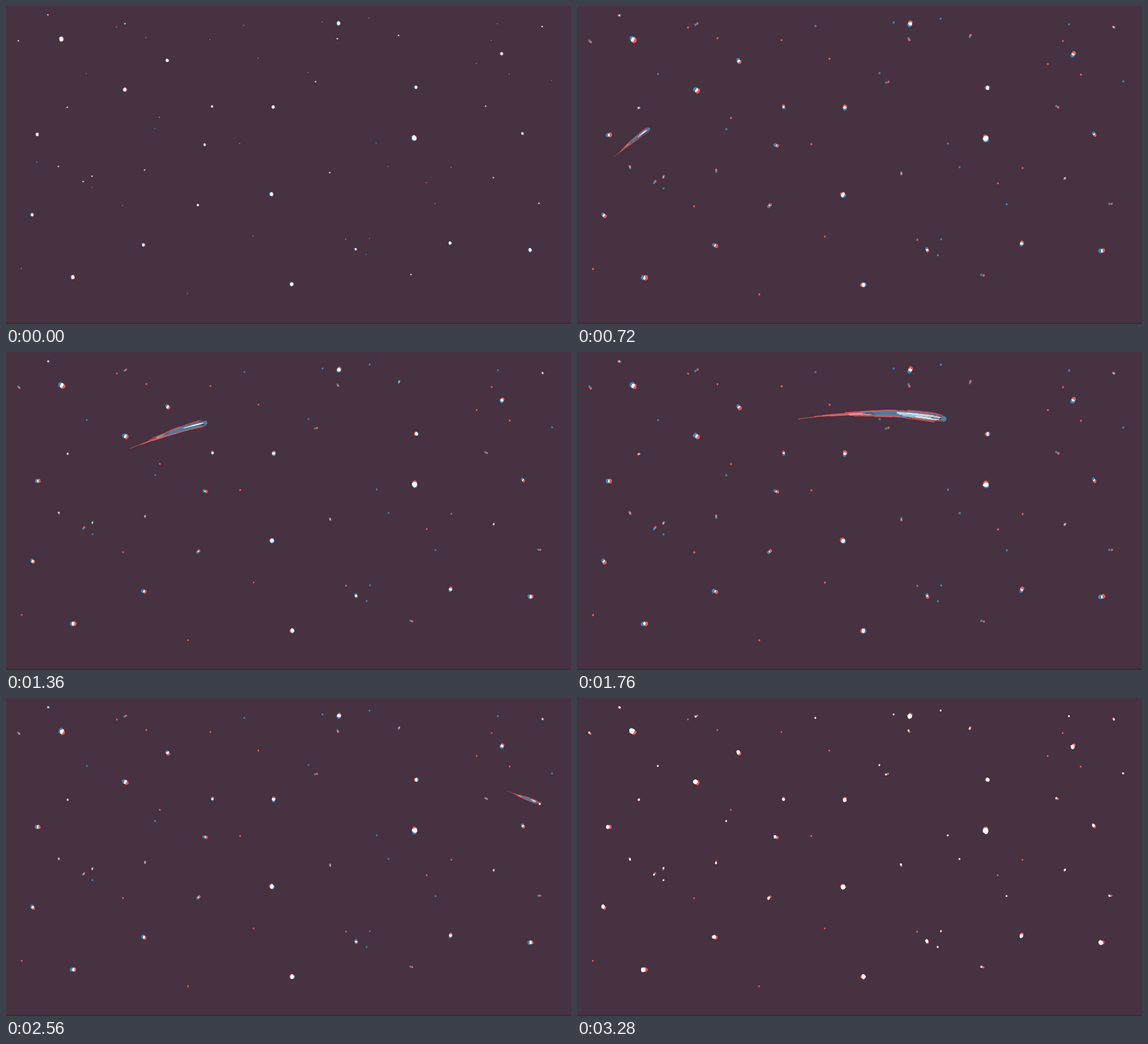
An HTML page with a canvas for the animation above (3.36 s loop, 960 by 540 pixels).

```html
<!DOCTYPE html>
<html lang="en">
<head>
<meta charset="utf-8">
<title>Comet</title>
<style>
html, body { margin: 0; width: 100%; height: 100%; overflow: hidden; background: #463240; }
canvas { display: block; }
</style>
</head>
<body>
<canvas id="sky" width="960" height="540"></canvas>
<script>
const ctx = document.getElementById('sky').getContext('2d');
const STEP = 80, LOOP = 3360, TAU = Math.PI * 2;
const BG = '#463240', RED = '#e65c5f', BLUE = '#4682a9', WHITE = '#fff';

// x, y, radius, direction in degrees in which the red layer slips off the blue
const BIG = [
  [94,56,4,50], [202,142,3.4,40], [274,92.5,2.8,70], [454,171.5,2.9,-100],
  [565,29.5,3.4,-90], [842,81,2.9,-70], [696.5,138,2.8,180], [53,218,2.8,0],
  [693.5,224,4.4,-125], [451,319.5,3.4,-150], [44.5,354.5,2.7,60], [233.5,405.5,2.7,30],
  [113.5,460.5,3.4,0], [485.5,472.5,3.4,180], [754.5,402.5,2.8,-90], [890.5,414.5,3.1,-10],
  [594,413,2.2,90], [877.5,216.5,2.2,70], [350,170.5,2,-120], [337.5,235.5,2.2,25],
  [326,338,2,-60]
];
// Positions of the faint stars seen in both layers, or in only one of them
const SMALL = [
  [550,283], [526,128.5], [911,35], [563,55.5], [202,30], [71,15], [21,59], [131,298],
  [104,172], [815,170], [667,50], [828,291.5], [688,456], [235.5,278.5], [146,289],
  [905.5,335], [89,272.5]
];
const REDS = [
  [187.5,35.5], [237.5,53.5], [346.5,57], [428,88.5], [824.5,58.5], [799,97.5],
  [855,115.5], [260.5,189], [397,233.5], [198,339], [26,445.5], [308.5,488.5],
  [577,396], [756,274], [714,300], [420,390.5]
];
const BLUES = [
  [404,33], [537,27], [617,20.5], [835,30], [136.5,114.5], [513,113], [927,127],
  [252.5,208], [629,232.5], [649,272.5], [729,335.5], [617.5,395], [612,422], [146,308.5]
];

function random(seed) {
  seed = seed * 7919 + 101;
  const next = () => (seed = (seed * 16807 + 11) % 2147483647) / 2147483647;
  next();
  return next;
}

// Smooth curve through [input, output] points, held at both ends
function curve(points) {
  const n = points.length - 1;
  const slope = i => {
    const a = points[Math.max(0, i - 1)], b = points[Math.min(n, i + 1)];
    return (b[1] - a[1]) / (b[0] - a[0]);
  };
  return v => {
    v = Math.min(points[n][0], Math.max(points[0][0], v));
    let i = 0;
    while (i < n - 1 && v > points[i + 1][0]) i++;
    const [a, p] = points[i], [b, q] = points[i + 1], h = b - a, u = (v - a) / h;
    return p + (q - p) * u * u * (3 - 2 * u) +
      h * u * (1 - u) * (slope(i) * (1 - u) - slope(i + 1) * u);
  };
}

const headX = curve([[0,52], [400,65], [720,124], [1360,342], [1760,627],
  [2240,860], [2560,905], [2720,908]]);
const pathY = curve([[52,265], [122,209], [200,168], [341,120], [520,104],
  [627,114], [790,138], [908,179]]);
const halfWidth = curve([[0,2], [1360,6], [2100,8], [2700,1.5]]);

function blob(x, y, r, seed) {
  const rnd = random(seed), path = new Path2D();
  for (let i = 0; i < 8; i++) {
    const a = (i + rnd() * .6) / 8 * TAU, k = r * (.88 + rnd() * .3);
    path.lineTo(x + Math.cos(a) * k, y + Math.sin(a) * k * 1.1);
  }
  path.closePath();
  return path;
}

function fill(path, color) {
  ctx.fillStyle = color;
  ctx.fill(path);
}

// Two slipping layers, white where they overlap
function pair(x, y, r, angle, swing, seed, cool) {
  const gap = 1.7 * swing, dx = Math.cos(angle) * gap, dy = Math.sin(angle) * gap;
  x += 1.1 * swing;
  y += 1.1 * swing;
  r += .7 * swing;
  const red = blob(x + dx + .5, y + dy, r, seed);
  const blue = blob(x - dx - .5, y - dy, r, seed + 7);
  fill(red, RED);
  fill(blue, cool);
  ctx.save();
  ctx.clip(red);
  fill(blue, WHITE);
  ctx.restore();
}

function drawStars(pose, cool) {
  // Four poses out, two poses back
  const swing = Math.sin(Math.PI / 2 * Math.min(pose / 4, (6 - pose) / 2));
  const single = (color, grow) => ([x, y], i) =>
    fill(blob(x + 1.2 * swing, y + 1.2 * swing, 1 + grow * swing, i * 6 + pose), color);

  REDS.forEach(single(RED, .7));
  BLUES.forEach(single(cool, .8));
  SMALL.forEach(([x, y], i) =>
    pair(x, y, 1.3, random(i)() * TAU, swing, i * 6 + pose, cool));
  BIG.forEach(([x, y, r, degrees], i) =>
    pair(x, y, r, degrees / 360 * TAU, swing, i * 6 + pose, cool));
}

function drawComet(t, frame) {
  const head = headX(t), tail = headX(t - 345), half = halfWidth(t);
  const rnd = random(frame);
  const between = (a, b) => a + (b - a) * rnd();
  const strand = (from, to, offset, width, color) => {
    ctx.beginPath();
    for (let k = 0; k <= 12; k++) {
      const u = Math.min(1, from + (to - from) * k / 12);
      const x = tail + (head - tail) * u;
      const angle = Math.atan2(pathY(x + 1) - pathY(x - 1), 2);
      const spread = half * offset * (.1 + .9 * u ** .8) * Math.min(1, .5 + (1 - u) * 6);
      ctx.lineTo(x - Math.sin(angle) * spread, pathY(x) + Math.cos(angle) * spread);
    }
    ctx.strokeStyle = color;
    ctx.lineWidth = width * Math.max(.6, half / 7);
    ctx.stroke();
  };
  const strands = (count, from, to, offset, width, color) => {
    for (let i = 0; i < count; i++)
      strand(between(...from), between(...to), between(...offset), between(...width), color);
  };

  if (head - tail > 4) {
    strands(1, [0, .02], [.3, .45], [-.2, .2], [.8, 1], RED);
    strands(6, [.12, .35], [.45, .65], [-.8, .8], [.6, 1.2], RED);
    strands(15, [.38, .65], [.82, .99], [-.75, .75], [.8, 1.9], BLUE);
    strands(2, [.28, .36], [.4, .5], [-.4, .4], [.5, .8], WHITE);
    strands(6, [.66, .84], [.86, .97], [-.5, .5], [.6, 1.3], WHITE);
    for (const side of [-1, 1]) {
      strands(4, [.3, .6], [.62, .85], [side * .8, side * 1.1], [.7, 1], RED);
      strands(3, [.72, .85], [.9, 1], [side * .75, side * 1.15], [.7, 1.1], RED);
    }
  }
  const x = head - (head - tail > 4 ? half * .5 : 0);
  fill(blob(x, pathY(x), half * .55, frame), BLUE);
}

// Broken rings left where the comet stops
function drawBurst(t, frame) {
  const rnd = random(frame), cx = 907, cy = 179;
  const reach = 12.5 * Math.min(1, (t - 2480) / 400);
  const keep = Math.min(1, (3120 - t) / 240);
  ctx.lineWidth = 1;
  for (let ring = 1; ring <= 4; ring++) {
    ctx.strokeStyle = ring === 1 ? WHITE : RED;
    for (let i = 0; i < 5; i++) {
      const a = (i + rnd() * .5) / 5 * TAU, r = reach * (ring / 4 + rnd() * .08);
      const span = .5 + rnd() * .5;
      if (rnd() > keep * .85) continue;
      ctx.beginPath();
      for (let k = 0; k < 3; k++)
        ctx.lineTo(cx + Math.cos(a + span * k / 2) * r, cy + Math.sin(a + span * k / 2) * r);
      ctx.stroke();
    }
  }
  if (keep > .6) fill(blob(cx, cy + 1, 1.7, frame), WHITE);
}

function draw(now) {
  const frame = Math.floor(now % LOOP / STEP), t = frame * STEP;
  ctx.fillStyle = BG;
  ctx.fillRect(0, 0, 960, 540);
  ctx.fillStyle = 'rgba(0,0,0,.15)';
  ctx.fillRect(0, 538, 960, 2);

  drawStars(frame % 6, t < 2640 ? BLUE : WHITE);
  if (t < 2800) drawComet(t, frame);
  if (t > 2480 && t < 3120) drawBurst(t, frame);
}

const start = performance.now();
function tick() {
  draw(performance.now() - start);
  requestAnimationFrame(tick);
}
tick();
</script>
</body>
</html>
```
